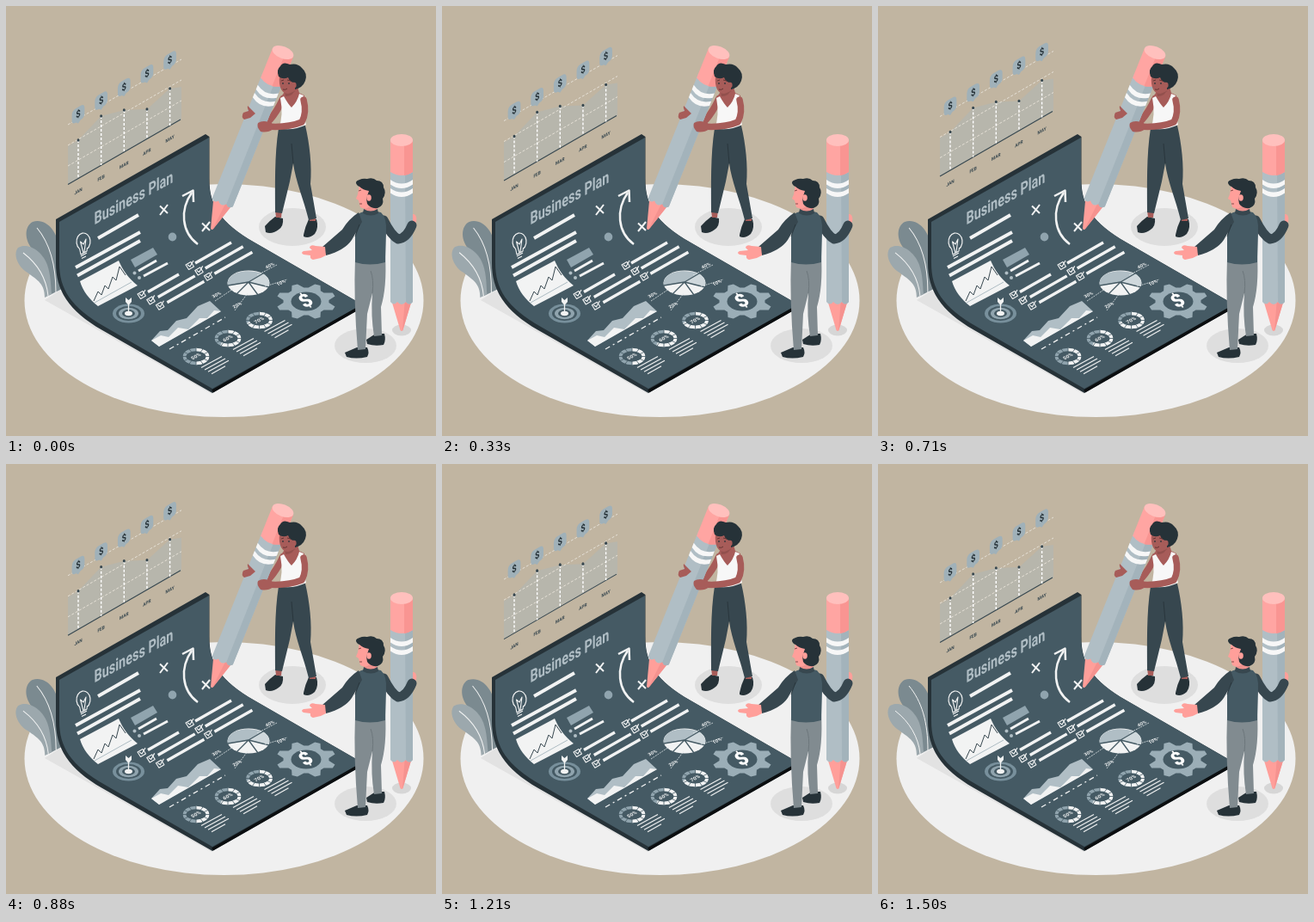
These frames come from a looping animation (500 by 500 pixels, 1.54 s). An HTML page with a canvas:

```html
<!DOCTYPE html>
<html lang="en">
<head>
<meta charset="utf-8">
<title>Business Plan</title>
<style>
html, body { margin: 0; height: 100%; overflow: hidden; background: #c1b5a1; }
canvas { display: block; width: 100vw; height: 100vh; }
</style>
</head>
<body>
<canvas id="stage" width="500" height="500"></canvas>
<script>
const canvas = document.getElementById('stage');
const scale = window.devicePixelRatio || 1;
canvas.width = canvas.height = 500 * scale;
const ctx = canvas.getContext('2d');

const LOOP = 1540, CYCLE = 1500;
const INK = '#263238', SLATE = '#37474f', FACE = '#455a64', MID = '#90a4ae',
      PALE = '#b0bec5', WHITE = '#f2f3f3', SKIN = '#ff9f9a', BROWN = '#a75c59',
      SHADE = '#dedede';

const fill = (d, color) => { ctx.fillStyle = color; ctx.fill(new Path2D(d)); };

function line(d, color = WHITE, width = 1, dash = [], cap = 'butt') {
  ctx.strokeStyle = color;
  ctx.lineWidth = width;
  ctx.lineCap = cap;
  ctx.lineJoin = 'round';
  ctx.setLineDash(dash);
  ctx.stroke(new Path2D(d));
  ctx.setLineDash([]);
}

function oval(x, y, rx, ry, color, width = 0, from = 0, to = 2 * Math.PI) {
  ctx.beginPath();
  ctx.ellipse(x, y, rx, ry, 0, from, to);
  if (width) {
    ctx.strokeStyle = color;
    ctx.lineWidth = width;
    ctx.lineCap = 'butt';
    ctx.stroke();
  } else {
    ctx.fillStyle = color;
    ctx.fill();
  }
}

function placed(x, y, draw, matrix) {
  ctx.save();
  ctx.transform(...matrix, x, y);
  draw();
  ctx.restore();
}

const WALL = [.866, -.5, 0, 1], GROUND = [.85, -.46, .5, .7];

function label(text, x, y, font, color, matrix = WALL, align = 'center') {
  placed(x, y, () => {
    ctx.font = font + ' Roboto, sans-serif';
    ctx.textAlign = align;
    ctx.textBaseline = align === 'left' ? 'alphabetic' : 'middle';
    ctx.fillStyle = color;
    ctx.fillText(text, 0, 0);
  }, matrix);
}

function floor() {
  ctx.fillStyle = '#c1b5a1';
  ctx.fillRect(0, 0, 500, 500);
  oval(253.5, 342.5, 232, 135.5, '#f0f0f0');
  fill('M45 342 L62 331 L110 358 L300 410 L239 451Z', '#e2e2e2');
  oval(333, 257, 39, 22, SHADE);
  oval(418, 395, 36, 20, SHADE);
  oval(460, 377, 11, 6.5, '#d6d6d6');
}

function leaves(angle) {
  ctx.save();
  ctx.translate(37, 294);
  ctx.rotate(angle * Math.PI / 180);
  ctx.translate(-37, -294);
  fill('M49 337 C53 306 44 296 32 284 C21 273 21 256 31 251 C47 246 61 263 62 284 L65 329Z', '#7b8a90');
  line('M36 258 C51 276 58 300 58 333', WHITE, 1);
  fill('M45 339 C45 323 37 319 25 310 C13 303 8 288 14 281 C26 274 43 286 48 301 C52 312 52 324 53 335Z', '#9ca8ad');
  line('M20 287 C37 300 47 318 49 337', WHITE, 1);
  ctx.restore();
}

function growthChart(lift) {
  const columns = [156, 128, 121, 120, 96];
  ctx.save();
  ctx.translate(0, -lift);
  fill('M72 163 L84 156 L110.5 128 L137.5 121 L164 120 L190.5 96 L204 94 V132 L72 207.5Z', 'rgba(170,182,185,.45)');
  for (const y of [186, 162, 138]) line(`M72 ${y} L204 ${y - 76}`, '#e5e0d6', 1, [3, 2]);
  line('M72 207.5 L203 132', SLATE, 1.1);
  columns.forEach((top, i) => {
    const x = 84 + i * 26.65, base = 200.5 - i * 15.4;
    line(`M${x} ${top} V${base}`, '#fff', 1.4, [3, 2]);
    oval(x, top, 1.5, 1.8, SLATE);
    placed(x, 126 - i * 15.7, () => {
      fill('M-3 -8.5 H3 Q8.5 -8.5 8.5 -3 V3 Q8.5 8 3 8 L0 10.5 L-3 8 Q-8.5 8 -8.5 3 V-3 Q-8.5 -8.5 -3 -8.5Z', '#a0b1b9');
    }, WALL);
    label('$', x, 126 - i * 15.7, '700 11px', INK);
    label(['JAN', 'FEB', 'MAR', 'APR', 'MAY'][i], x, 215.5 - i * 15.2, '700 5.5px', SLATE);
  });
  ctx.restore();
}

function checklist(x, y, lines) {
  lines.forEach(([dx, length], i) => {
    const bx = x + i * 10.7, by = y + i * 6.4;
    line(`M${bx - 5} ${by - 1} l6 -3.5 l3.5 5.5 l-6 3.5Z`, WHITE, 1.1);
    line(`M${bx - 3} ${by - 1} l3 2 l4 -7`, WHITE, 1.2);
    line(`M${bx + dx} ${by - dx * .5} l${length} ${-length * .57}`, WHITE, 3.4);
  });
}

function donut(x, y, text, share) {
  oval(x, y, 13.5, 8, MID, 3.6);
  const start = -Math.PI / 2;
  oval(x, y, 13.5, 8, WHITE, 3.6, start, start + share * 2 * Math.PI);
  for (let k = 0; k < 12; k++) {
    const a = k * Math.PI / 6, c = Math.cos(a), s = Math.sin(a);
    line(`M${x + 10 * c} ${y + 5.5 * s} L${x + 16 * c} ${y + 10 * s}`, FACE, .8);
  }
  label(text, x, y, '700 6.5px', WHITE, GROUND);
  for (let k = 0; k < 4; k++)
    line(`M${x + 6 + k * 4} ${y + 13 + k * 2.4} l${k === 3 ? 16 : 24} ${k === 3 ? -9 : -13}`, WHITE, 1.1);
}

function gear(x, y) {
  const points = [];
  for (let k = 0; k < 32; k++) {
    const a = (k + 1.5) * Math.PI / 16, r = k % 4 < 2 ? 1 : .76;
    points.push(`${x + 35 * r * Math.cos(a)} ${y + 21 * r * Math.sin(a)}`);
  }
  fill('M' + points.join('L') + 'Z', '#9baeb7');
  oval(x, y, 17.5, 11, FACE);
  label('$', x, y, '900 25px', '#fff', [.8, -.42, .55, .72]);
}

function pie() {
  oval(282, 322, 24.5, 14.5, WHITE);
  fill('M282 321 L258 325 C255 311 277 304 298 311Z', PALE);
  fill('M282 321 L298 311 C305 314 308 321 305 327Z', '#cfd8dc');
  line('M258 325 L282 321 L299 311 M282 321 L306 327 M282 321 L293 336 M282 321 L268 335', FACE, 1.3);
  line('M292 313 L315 301 M298 327 L327 318 M243 343 L264 329 M266 354 L281 334', '#dfe5e8', .8, [2, 1]);
  label('40%', 307, 302, '700 6px', WHITE, GROUND);
  label('10%', 320, 322, '700 6px', WHITE, GROUND);
  label('30%', 245, 336, '700 6px', WHITE, GROUND);
  label('20%', 269, 348, '700 6px', WHITE, GROUND);
}

function paper() {
  fill('M58 248 L232 149 L236 152 L415 348 V351 L240 450 L112 377 C72 354 58 330 58 299Z', INK);
  // The hidden floor behind the sheet's bend is restored by the front face's own outline.
  const side = 'C75 350 62 329 62 299';
  fill(`M62 251 L236 153 V201 C236 231 249 252 289 275 L414 347 L240 445 L115 373 ${side}Z`, FACE);
}

function sheetBase() {
  // The right side repeats the left side's bend, moved along the sheet's width.
  fill('M58 248 L232 149 L236.5 152 V201 C236 231 249 252 289 275 L414 347 V351 L240 450 L112 377 C72 354 58 330 58 299Z', INK);
  fill('M62 251 L236 153 V201 C236 231 249 252 289 275 L414 347 L240 445 L115 373 C75 350 62 329 62 299Z', FACE);
  line('M240 448 L414 349', '#0b0e10', 3.5);
}

function sheet() {
  sheetBase();
  label('Business Plan', 102.5, 254.5, '600 20px', PALE, [.722, -.39, 0, 1], 'left');

  oval(90, 274, 8, 10, WHITE, 1.2, 2.2, 7.2);
  line('M85.5 282 L87 289 L94 285 L94.5 281 M87 291 L94 287 M88 293.5 L93 291 M90 287 L86.5 274 L90 277 L93 271 L91 286', WHITE, 1.1);
  line('M107 270 L154 243 M81 304 L156 263 M83 313.5 L156 273', WHITE, 3.8);

  fill('M86 320 L131 296 C136 308 143 317 153 325 L107 349 C97 341 89 331 86 320Z', WHITE);
  line('M102 343 L107 332 L111 336 L115 325 L119 329 L124 315 L128 319 L132 303 L139 313', SLATE, 1);
  line('M103 345 L146 321', MID, .7);

  fill('M145 295 L171 281 L176 289 L150 304Z', MID);
  oval(149.5, 310.5, 2, 2, PALE);
  oval(155, 316, 2, 2, PALE);
  line('M154 308 L175 296 M160 314 L188 299', WHITE, 3);
  checklist(158, 336, [[7, 36], [8, 43], [8, 43]]);
  checklist(214, 302, [[6, 42], [7, 44], [7, 44]]);

  line('M179 232.5 L188 241 M188 231 L179 243 M228 252.5 L237 261 M237 251 L228 262', WHITE, 2);
  oval(193.5, 268.5, 4.8, 5, MID);
  line('M223 277 C204 263 202 237 216 217', WHITE, 2.5);
  line('M205 221 L217.5 214.5 L218 228', WHITE, 2.5);

  oval(142.5, 357.5, 18.5, 11, '#78909c');
  oval(142.5, 357.5, 14.5, 8.5, FACE);
  oval(142.5, 357.5, 11.5, 6.8, MID);
  oval(142.5, 357.5, 7.5, 4.4, FACE);
  oval(142.5, 357.5, 4.5, 2.7, WHITE);
  line('M142.5 357 V342', WHITE, 1.3);
  fill('M142.5 348 L139 344 V339 L142.5 342 L146 339 V344Z', WHITE);

  fill('M169 389 L179 378 L188 377 L198 366 L210 363 L223 349 L237 343 L250 355 L178 396Z', PALE);
  fill('M169 389 L180 383 L189 385 L200 374 L212 376 L225 363 L234 363 L242 354 L250 355 L178 396Z', WHITE);
  line('M190 399 L255 362', WHITE, 1.3, [6, 4, 2, 4]);

  pie();
  gear(349, 343.5);
  donut(221, 407.5, '50%', .5);
  donut(258, 386.5, '60%', .6);
  donut(294.5, 365.5, '70%', .7);
}

function pencil(x, y, angle) {
  ctx.save();
  ctx.translate(x, y);
  ctx.rotate(angle);
  fill('M-12.5 184 L-1.5 221 Q0 223 1.5 221 L12.5 184Z', SKIN);
  fill('M4 184 L1 222 L12.5 184Z', '#f5928f');
  fill('M-13 32 H13 V188 Q9 193 5 188 Q0 194 -5 188 Q-9 193 -13 188Z', PALE);
  fill('M4 32 H13 V188 Q9 193 5 188Z', '#a3b3bb');
  fill('M-13 0 V37 Q0 45 13 37 V0Z', '#ffa5a2');
  fill('M3 0 V41 Q9 40 13 37 V0Z', '#f99592');
  oval(0, 0, 13, 7, '#ffc0bd');
  for (const top of [46, 56])
    fill(`M-13 ${top} Q0 ${top + 9} 13 ${top} v5.5 Q0 ${top + 14.5} -13 ${top + 5.5}Z`, '#f7f7f7');
  ctx.restore();
}

function woman() {
  line('M322 108 Q315 123 307 132', BROWN, 8, [], 'round');
  pencil(322, 54, .383);
  fill('M290 125 L283 118 Q280 114 281 119 L282 122 L276 124 Q273 129 277 132 L284 130Z', BROWN);

  fill('M301 256 Q306 250 313 245 L322 247 Q323 256 317 260 Q309 266 302 263Z', INK);
  fill('M346 266 Q348 256 352 248 H361 Q364 258 359 265 Q352 271 346 268Z', INK);
  fill('M313 237 h8 l-1 9 h-6Z M352 244 h8 v6 h-7Z', BROWN);
  fill('M317 142 L348 139 C353 160 356 186 354 207 L361 247 L352 249 C346 224 337 205 334 183 L330 204 L321 241 L313 240 C313 210 312 173 317 142Z', SLATE);
  line('M334 183 L332 160', INK, .8);

  fill('M319 107 L325 98 L339 94 L341 101 L347 104 L344 122 L324 122Z', BROWN);
  fill('M324 99 L338 95 Q334 105 325 105Z', '#92504d');
  fill('M319 107 L323 105 Q328 114 332 118 Q339 111 341 102 L346 104 Q343 118 349 138 Q333 146 317 142 Q323 128 319 107Z', '#f7f7f7');
  line('M346 109 Q350 124 344 135 Q327 142 303 140', BROWN, 7.5, [], 'round');
  fill('M309 136 Q299 132 293 136 Q291 140 296 146 Q304 148 311 143Z', BROWN);
  fill('M318 82 Q317 91 320 97 Q324 104 331 101 Q341 98 340 85 Q332 76 318 82Z', BROWN);
  fill('M317 82 Q314 74 319 70 Q322 64 330 68 Q339 66 344 72 Q351 78 348 87 Q345 95 336 97 L336 89 Q330 89 328 83 Q322 86 317 82Z', INK);
  oval(335, 92, 2.6, 3.3, BROWN);
  line('M320 87 l3 -1 M327 86 l4 1 M322 97 q3 1 5 -1', '#5f302f', .9);
  oval(322, 90, .8, 1, INK);
  oval(329, 90, .8, 1, INK);
}

function man() {
  fill('M470 246 Q472 240 476 243 Q479 248 475 255 L470 257Z', SKIN);
  pencil(460, 156, 0);

  fill('M394 403 Q401 400 408 397 H420 Q423 403 420 408 Q407 411 396 408Z', INK);
  fill('M419 388 Q425 384 430 381 H440 Q442 389 439 394 Q429 396 420 393Z', INK);
  fill('M406 293 L441 291 Q443 327 436 350 L437 383 L428 384 Q424 360 426 334 L420 358 L418 399 L409 400 Q404 342 406 293Z', '#818b90');
  line('M426 334 Q428 318 424 308', '#6d777c', 1);

  line('M439 249 Q448 267 456 271 Q466 270 472 255', SLATE, 11, [], 'round');
  fill('M409 242 Q421 235 436 240 Q443 246 442 263 L441 298 Q423 303 406 298 L406 268Z', FACE);
  fill('M410 240 Q398 248 391 260 L368 280 L372 290 Q394 284 402 272 L414 251Z', SLATE);
  line('M406 268 L411 254', INK, .8);

  fill('M371 280 L360 279 Q354 277 353 281 L356 284 L346 285 Q342 287 346 289 L354 290 Q353 294 357 295 L366 293 L372 290Z', SKIN);
  fill('M416 228 L431 224 L432 239 Q424 243 416 239Z', '#ed918d');
  fill('M411 208 L409 219 L407 224 L410 226 L412 234 Q419 238 426 231 L433 219 L428 206Z', SKIN);
  fill('M409 209 Q404 204 411 202 Q415 200 420 201 Q427 199 431 203 Q439 203 439 211 Q443 217 438 224 Q440 232 432 235 Q424 236 420 230 L419 224 L422 215 Q415 214 411 210Z', INK);
  oval(422, 223, 2.8, 3.7, SKIN);
  line('M410 215 l3 -1 M411 230 l3 0', '#7a4543', .9);
  fill('M416 236 Q424 241 432 236 L433 241 Q424 246 415 241Z', SLATE);
}

function frame() {
  const phase = Math.min(performance.now() % LOOP, CYCLE) / CYCLE;
  const lift = 10 * (1 - Math.abs(1 - 2 * phase));
  // Sway of one degree each way: peaks at a quarter and three quarters.
  const sway = phase < .25 ? 4 * phase : phase < .75 ? 2 - 4 * phase : 4 * phase - 4;

  ctx.setTransform(scale, 0, 0, scale, 0, 0);
  floor();
  leaves(sway);
  growthChart(lift);
  sheet();
  woman();
  man();
  requestAnimationFrame(frame);
}
frame();
</script>
</body>
</html>
```
